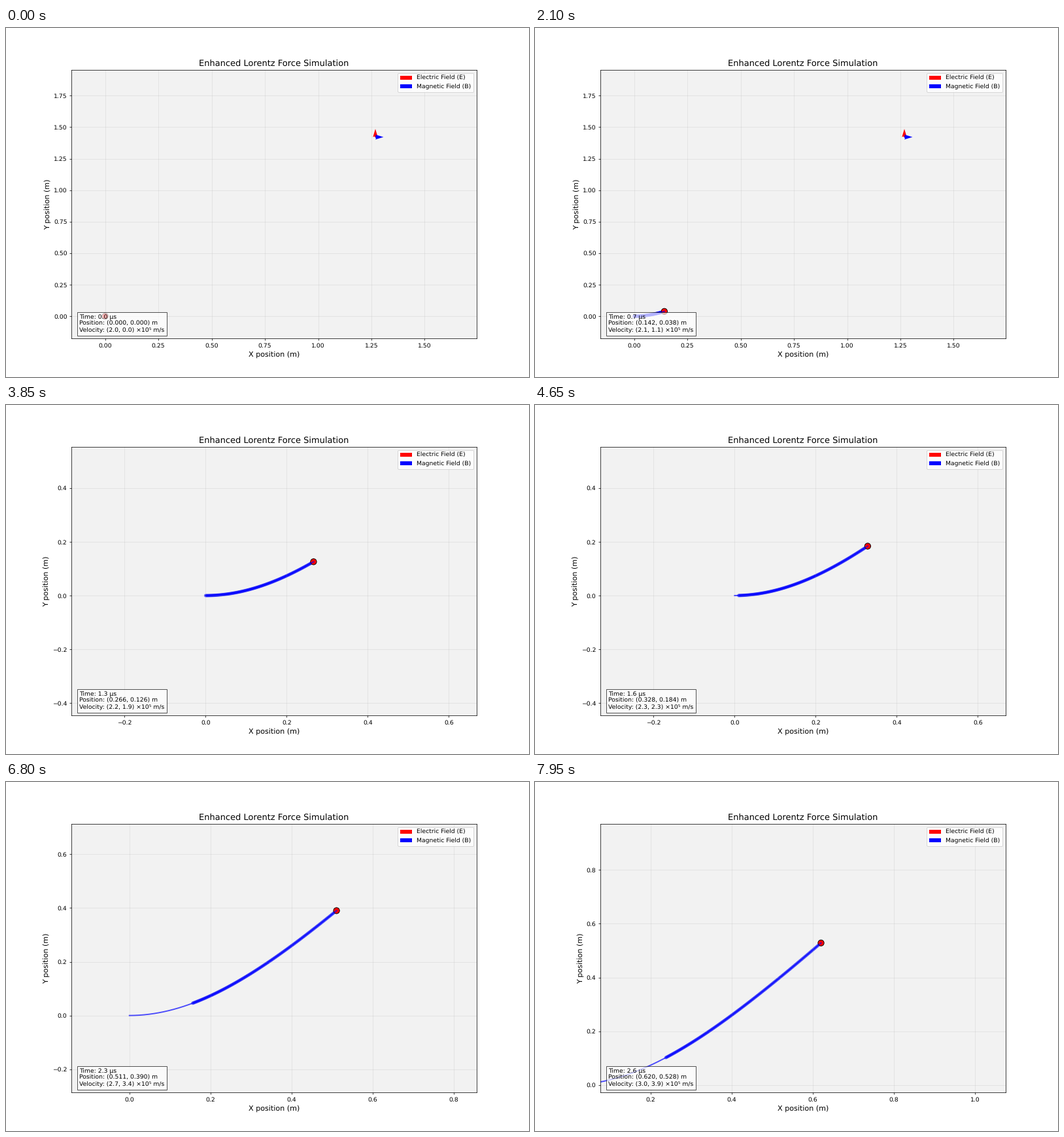
A matplotlib script for the animation above (8 s loop, 800 px wide and 533 px high).

```python
import numpy as np
import matplotlib.pyplot as plt
from matplotlib.animation import FuncAnimation

# Proton in crossed fields
Q, M = 1.602e-19, 1.673e-27
E_Y, B_Z = 2000.0, 0.002
DT, STEPS = 1e-8, 500
TOTAL_FRAMES = 300
SHOWN_FRAMES = 160
TRAIL = 150
RECENTER = 50


def simulate():
    """Boris push in the plane, with x + iy as one complex number."""
    kick = 1j * Q * E_Y / M * DT / 2
    turn = 1j * Q * B_Z / M * DT / 2
    pos, vel = [0j], [2e5 + 0j]
    for _ in range(STEPS):
        v = (vel[-1] + kick) * (1 - turn) / (1 + turn) + kick
        vel.append(v)
        pos.append(pos[-1] + v * DT)
    return [np.column_stack((np.real(z), np.imag(z))) for z in (pos, vel)]


pos, vel = simulate()
x_max, y_max = pos.max(axis=0)

plt.rcParams["text.hinting"] = "none"
DPI = 200 / 3
fig, ax = plt.subplots(figsize=(800.01 / DPI, 533.01 / DPI), dpi=DPI)
ax.set_facecolor("#f2f2f2")
ax.grid(True, alpha=0.3)
ax.set_title("Enhanced Lorentz Force Simulation", fontsize=14)
ax.set_xlabel("X position (m)", fontsize=12)
ax.set_ylabel("Y position (m)", fontsize=12)

# Two equal sizes keep the dots from being rounded to whole pixels
particle = ax.scatter([], [], c="red", edgecolors="black", zorder=2)
particle.set_sizes([100, 100], DPI)
path, = ax.plot([], [], "b-", lw=2, alpha=0.7)
trail = ax.scatter([], [], c="blue", alpha=0.4)
trail.set_sizes([20, 20], DPI)

corner = 0.8 * x_max, 0.8 * y_max
ax.quiver(*corner, 0, 1, color="red", scale=50, label="Electric Field (E)")
ax.quiver(*corner, 1, 0, color="blue", scale=50, label="Magnetic Field (B)")
ax.legend(loc="upper right")

info = ax.text(0.02, 0.02, "", transform=ax.transAxes, va="bottom",
               bbox=dict(facecolor="white", alpha=0.7))


def step_at(frame):
    return frame * (STEPS + 1) // TOTAL_FRAMES


def set_view(frame):
    if frame < RECENTER:
        ax.set_xlim(-0.1 * x_max, 1.1 * x_max)
        ax.set_ylim(-0.1 * y_max, 1.1 * y_max)
    else:
        cx, cy = pos[step_at(frame - frame % RECENTER)]
        ax.set_xlim(cx - 0.5, cx + 0.5)
        ax.set_ylim(cy - 0.5, cy + 0.5)


def update(frame):
    n = step_at(frame)
    x, y = pos[n]
    vx, vy = vel[n] / 1e5
    set_view(frame)
    particle.set_offsets([(x, y)])
    path.set_data(pos[:n + 1, 0], pos[:n + 1, 1])
    trail.set_offsets(pos[max(0, n - TRAIL):n + 1])
    info.set_text(f"Time: {n / 100:.1f} μs\n"
                  f"Position: ({x:.3f}, {y:.3f}) m\n"
                  f"Velocity: ({vx:.1f}, {vy:.1f}) ×10⁵ m/s")
    return particle, path, trail, info


anim = FuncAnimation(fig, update, frames=SHOWN_FRAMES, interval=50,
                     init_func=lambda: update(0), repeat=True, repeat_delay=0)
plt.show()
```
